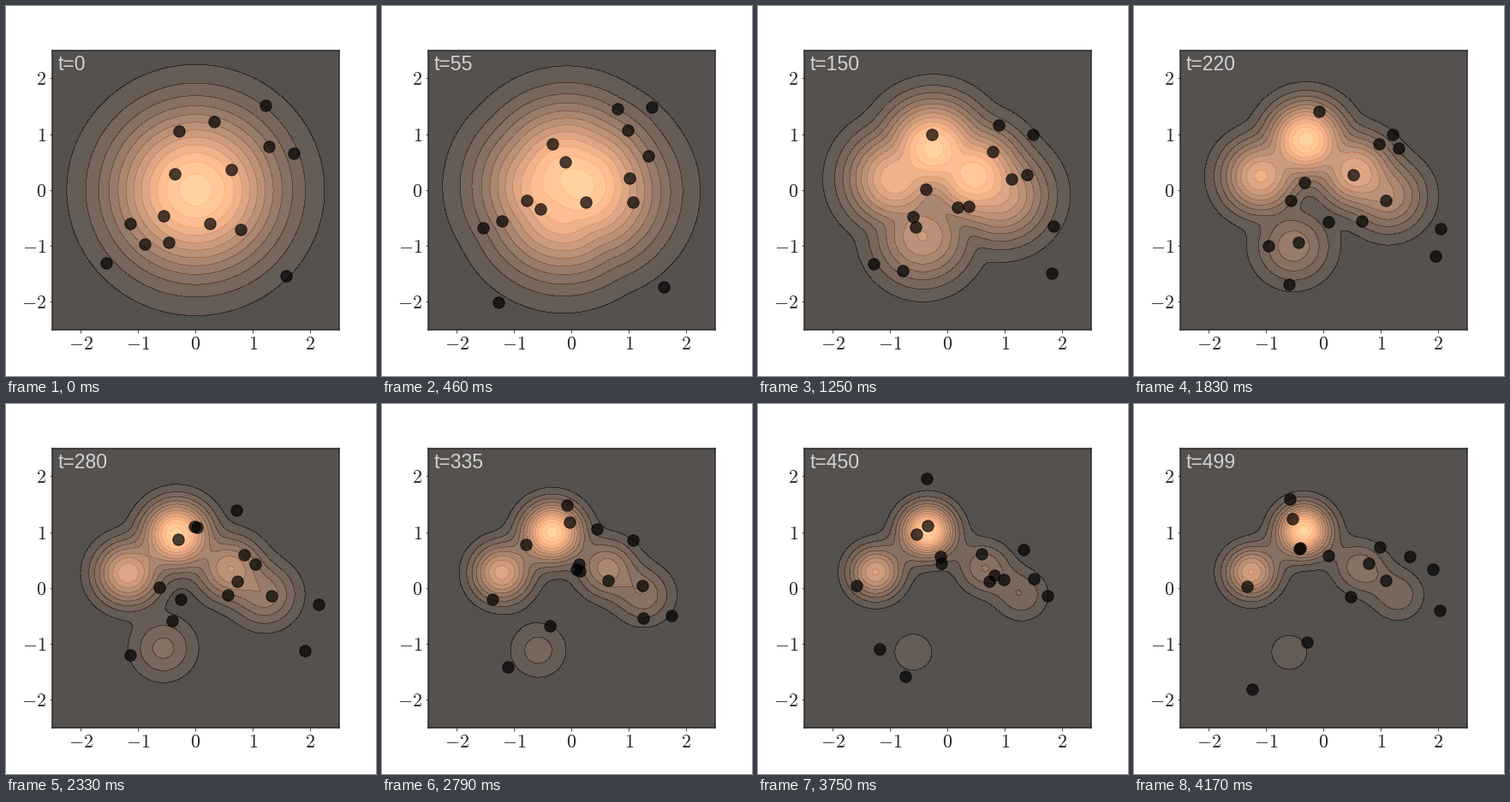
Write a matplotlib script that moves like this. It is 432x432 px and loops after 4.21 s.

```python
import numpy as np
import matplotlib.pyplot as plt
from matplotlib.animation import FuncAnimation

plt.rcParams.update({
    "mathtext.fontset": "cm",
    "axes.edgecolor": "0.15",
    "axes.linewidth": 1.5,
    "xtick.color": "0.15",
    "ytick.color": "0.15",
})

LOOP_MS, TICK_MS = 4210, 10
STEPS = np.append(np.arange(0, 500, 5), 499)
LEVELS = 0.08 * np.arange(14)
VAR = 0.1      # variance of every mode
DT = 0.0015    # Langevin step size

MODES = np.array([[-0.35, 1.03], [-1.26, 0.285], [0.64, 0.37],
                  [1.295, -0.124], [-0.6, -1.15]])
HEIGHTS = np.array([1, 0.647, 0.305, 0.222, 0.127])

START = np.array([
    [1.22, 1.52], [1.28, 0.78], [1.71, 0.66], [0.32, 1.23], [-0.29, 1.06],
    [-0.36, 0.29], [0.62, 0.37], [-1.14, -0.60], [-0.89, -0.97],
    [-0.56, -0.46], [-0.47, -0.94], [0.25, -0.60], [0.79, -0.71],
    [-1.56, -1.30], [1.58, -1.53],
])


def blend(t):
    """Share of the target in the geometric path, eased from 0 to 1."""
    return (1 - np.cos(np.pi * t / 500)) / 2


def bumps(p):
    """Value of each mode at points p with shape (..., 2)."""
    d2 = ((p[..., None, :] - MODES)**2).sum(axis=-1)
    return HEIGHTS * np.exp(-d2 / (2 * VAR))


def density(t):
    """Unnormalised density on the grid, scaled to a peak of 1."""
    b = blend(t)
    logp = (1 - b) * log_prior + b * log_target
    return np.exp(logp - logp.max())


def drift(p, t):
    """Gradient of the log density at points p."""
    w = bumps(p)
    pull = (w @ MODES / w.sum(axis=-1, keepdims=True) - p) / VAR
    b = blend(t)
    return b * pull - (1 - b) * p


def sample(seed=4):
    """Langevin paths of all particles, one position per step."""
    rng = np.random.default_rng(seed)
    paths = [START]
    for t in range(499):
        p = paths[-1]
        noise = rng.normal(0, np.sqrt(2 * DT), p.shape)
        paths.append(p + DT * drift(p, t) + noise)
    return np.array(paths)


axis = np.linspace(-2.5, 2.5, 150)
grid = np.stack(np.meshgrid(axis, axis), axis=-1)
log_prior = -(grid**2).sum(axis=-1) / 2
log_target = np.log(bumps(grid).sum(axis=-1))
paths = sample()

fig, ax = plt.subplots(figsize=(6, 6), dpi=72)
fig.subplots_adjust(left=0.125, right=0.9, bottom=0.125, top=0.88)
ax.set(xlim=(-2.5, 2.5), ylim=(-2.5, 2.5))
ticks = range(-2, 3)
names = [f"${v}$" for v in ticks]
ax.set_xticks(ticks, names, fontsize=22)
ax.set_yticks(ticks, names, fontsize=22)

dots = ax.scatter(*START.T, s=180, c="k", alpha=0.7, zorder=3)
label = ax.text(-2.4, 2.15, "", color="lightgray", fontsize=23, zorder=4,
                family="Liberation Sans")
field, shown = None, None


def update(tick):
    global field, shown
    i = (tick * TICK_MS + TICK_MS // 2) * len(STEPS) // LOOP_MS
    t = STEPS[i]
    if t != shown:
        if field is not None:
            field.remove()
        field = ax.contourf(*grid.transpose(2, 0, 1), density(t),
                            levels=LEVELS, cmap="copper", alpha=0.7, zorder=1)
        dots.set_offsets(paths[t])
        label.set_text(f"t={t}")
        shown = t
    return field, dots, label


anim = FuncAnimation(fig, update, frames=LOOP_MS // TICK_MS,
                     interval=TICK_MS, repeat=True)
plt.show()
```
